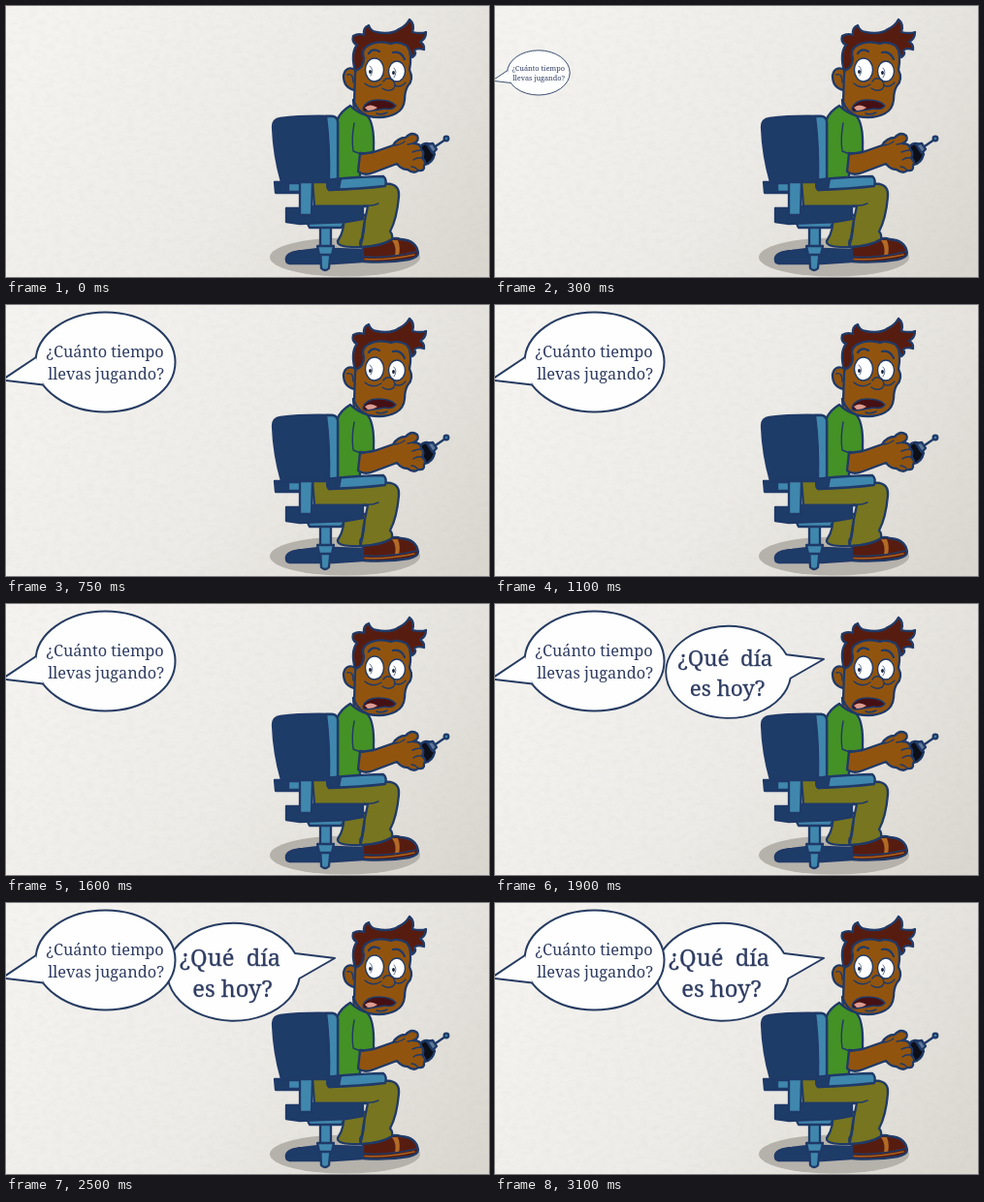
Write an HTML page that moves like this. It is 498 px wide and 280 px high and loops after 3150 ms.

```html
<!DOCTYPE html>
<html lang="es">
<head>
<meta charset="utf-8">
<title>¿Qué día es hoy?</title>
<style>
  html, body { margin: 0; width: 100%; height: 100%; overflow: hidden; background: #eceae5; }
  svg { position: absolute; left: 0; top: 0; width: 498px; height: 280px; display: block; }
  .ink { stroke: #1f3a68; stroke-width: 2.3; stroke-linejoin: round; stroke-linecap: round; }
  .line { fill: none; }
  .thin { stroke-width: 1.4; }
  .navy { fill: #1e3c68; }
  .blue { fill: #4087ad; }
  .olive { fill: #77751f; }
  .green { fill: #449126; }
  .skin { fill: #91540f; }
  .hair { fill: #571c10; }
  .bubble ellipse, .bubble path { fill: #fdfefd; stroke: #263b62; stroke-width: 2; stroke-linejoin: round; }
  .bubble text { font-family: "Noto Serif", "Liberation Serif", serif; fill: #2f3c62; text-anchor: middle; }
  .small { font-size: 16.3px; }
  .big { font-size: 23.7px; stroke: #2f3c62; stroke-width: .3; }
</style>
</head>
<body>
<svg viewBox="0 0 498 280">
  <defs>
    <linearGradient id="paper" gradientUnits="userSpaceOnUse" x1="60" y1="0" x2="470" y2="290">
      <stop offset="0" stop-color="#f4f3ef"/>
      <stop offset=".5" stop-color="#edebe7"/>
      <stop offset="1" stop-color="#dad7d0"/>
    </linearGradient>
    <filter id="grain" x="0" y="0" width="100%" height="100%">
      <feTurbulence type="fractalNoise" baseFrequency=".12 .2" numOctaves="3" seed="4"/>
      <feColorMatrix values="0 0 0 0 .45  0 0 0 0 .43  0 0 0 0 .4  .5 0 0 0 -.2"/>
    </filter>
  </defs>
  <rect width="498" height="280" fill="url(#paper)"/>
  <rect width="498" height="280" filter="url(#grain)" opacity=".3"/>
</svg>

<svg viewBox="0 0 498 280">
  <ellipse cx="349.500" cy="259.500" rx="77.500" ry="20" fill="#b5b1ab"/>

  <!-- chair base -->
  <g class="ink">
    <path class="navy" d="M289 260Q291 254 306 253L323 251H337L367 252V264L337 266H292Q288 265 289 260Z"/>
    <path class="blue" d="M324 227H335V249L333 271Q329 275 325 271L324 249Z"/>
    <path class="blue" d="M321 248H338L336 257H323Z"/>
    <path class="blue" d="M310 223H349L346 229H313Z"/>
  </g>

  <!-- shoe and legs -->
  <g class="ink">
    <path class="hair" d="M368 248Q386 249 397 241Q402 239 407 241Q423 242 425 255Q425 260 415 262Q392 266 368 264Z"/>
    <path d="M398 242Q403 249 401 258L405 258Q407 249 404 242Z" fill="#b36a25" stroke="none"/>
    <path class="line" d="M370 261.500Q394 263 421 257" style="stroke:#a8621f;stroke-width:1.600"/>
    <path class="line thin" d="M369 259Q394 261 423 254"/>
    <path class="olive" d="M348 216Q350 231 342 243Q341 250 366 249L382 216Z"/>
    <path class="olive" d="M316 181L343 180L397 184Q406 186 405 197Q403 220 396 233Q399 236 398 241Q387 248 366 249Q364 244 367 240Q369 224 373 207H318Z"/>
    <path class="line thin" d="M369 206Q378 207 384 204M370 221Q370 234 366 248"/>
  </g>

  <!-- torso -->
  <g class="ink">
    <path class="skin" d="M358 97L359 109L375 114L378 105Z"/>
    <path class="green" d="M355 103Q345 109 342 117V180H365V152Q381 154 379 147Q380 121 372 113Q362 110 355 103Z"/>
    <path class="line thin" d="M359 121Q356 137 358 150L366 153M356 104Q364 112 374 114"/>
  </g>

  <!-- seat, back and arm rest -->
  <g class="ink">
    <path class="navy" d="M289 209H303L316 207H368V220L351 223L303 225L289 223Z"/>
    <path class="navy" d="M277 182H303V193H278Z"/>
    <path class="blue" d="M291 183H304V192H291Z"/>
    <path class="navy" d="M283 116Q306 113 337 114Q342 115 342 120V182H284Q276 154 275 125Q275 117 283 116Z"/>
    <path class="blue" d="M330 114H337Q342 115 342 120V182H333Q334 144 330 114Z"/>
    <path class="blue" d="M303 182H316L315 216H303Z"/>
    <path class="blue" d="M332 180Q350 177 389 176Q393 179 391 186Q366 189 333 190Q330 187 332 180Z"/>
    <path class="navy" d="M332 180L345 178.500L343 189.500L333 190Q330 187 332 180Z"/>
  </g>

  <!-- arm and remote -->
  <g class="ink">
    <path class="line" d="M437 149L453 138"/>
    <circle class="blue" cx="454" cy="137" r="2.300"/>
    <path d="M426 146Q432 140 437 143L442 153Q440 162 432 164Z" fill="#0d0f18"/>
    <path d="M434 143L440 142L444 148L440 152Z" fill="#5f7898"/>
    <path class="skin" d="M365 153L379 151L399 144Q404 136 412 136Q418 129 424 134Q427 139 420 142Q428 142 428 148Q432 152 429 157Q434 161 431 165Q432 171 425 170Q421 174 414 169Q408 169 403 163L379 172Q369 176 363 171Z"/>
    <path class="line thin" d="M399 144Q406 144 411 140M420 142L414 143M428 149Q423 149 419 151M429 157Q424 156 420 159M425 170Q422 166 418 166"/>
  </g>

  <!-- head -->
  <g class="ink">
    <path class="skin" d="M361 66Q350 61 348 72Q348 85 360 87Z"/>
    <path class="line thin" d="M352 71Q358 69 358 79"/>
    <path class="skin" d="M365 42Q381 31 414 38Q419 52 416 66Q421 76 414 83Q411 89 411 97Q410 107 402 111Q391 117 374 114Q362 109 359 99L360 70Z"/>
    <path class="hair" d="M360 67Q355 49 362 40Q356 38 358 31Q363 28 369 30Q368 22 374 20Q376 26 382 27Q397 30 405 24Q412 21 416 14Q422 19 419 27Q428 29 433 27Q433 34 427 37Q432 40 431 45Q424 43 421 46Q424 50 419 53Q417 46 413 41Q404 36 397 39Q384 35 373 41Q366 45 369 54Q369 64 360 67Z"/>
    <path class="line" d="M374 49Q378 43 385 47M399 48Q407 46 411 55"/>
    <g class="thin">
      <ellipse cx="380" cy="66" rx="9.500" ry="12" fill="#fff"/>
      <ellipse cx="403" cy="67.500" rx="8.500" ry="10.500" fill="#fff"/>
    </g>
    <path class="line thin" d="M370 80Q378 87 387 81M401 82Q407 85 412 79"/>
    <path class="line thin" d="M389 78Q393 72 399 77Q403 82 399 86Q393 89 388 85"/>
    <path d="M368 106Q371 97 384 97Q397 97 402 103Q398 108 391 106Q380 108 372 109Q368 109 368 106Z" fill="#451014" stroke-width="1.400"/>
    <path d="M370 105Q375 100 383 105Q379 108 373 108Z" fill="#dc9c91" stroke="none"/>
    <path class="line thin" d="M382 111Q387 113 393 110"/>
    <path class="line" d="M375 62Q380 66 376 72M400 64Q404 68 400 74" stroke-width=".7"/>
  </g>
  <g fill="#14203a">
    <ellipse cx="375.500" cy="68" rx="1.400" ry="1.900"/>
    <ellipse cx="399.500" cy="69" rx="1.400" ry="1.900"/>
  </g>

  <g class="bubble" id="answer">
    <path d="M298 52L339 57L302.500 78A68.500 50.500 0 1 1 298 52Z"/>
    <text class="big" x="231" y="64.500">¿Qué&#160; día</text>
    <text class="big" x="233.500" y="97">es hoy?</text>
  </g>
  <g class="bubble" id="question">
    <ellipse cx="102.500" cy="59" rx="72" ry="51.500"/>
    <path d="M31 54L-4 77.500L38.500 82.500"/>
    <text class="small" x="102" y="54">¿Cuánto tiempo</text>
    <text class="small" x="103" y="76.500">llevas jugando?</text>
  </g>
</svg>

<script>
  const LOOP = 3150, STEP = 50, GROW = 400;
  const bubbles = [
    { id: "question", start: 228, x: -2, y: 77 },
    { id: "answer", start: 1655, x: 339, y: 57 }
  ].map(b => ({ ...b, el: document.getElementById(b.id) }));

  const easeOut = p => 1 - (1 - p) ** 3;

  // Each bubble grows out of the tip of its tail.
  function draw() {
    const t = Math.floor(performance.now() % LOOP / STEP) * STEP;
    for (const { el, start, x, y } of bubbles) {
      const s = easeOut(Math.min(1, Math.max(0, (t - start) / GROW)));
      el.style.display = s > 0 ? "" : "none";
      el.setAttribute("transform", `translate(${x} ${y}) scale(${s}) translate(${-x} ${-y})`);
    }
    requestAnimationFrame(draw);
  }
  draw();
</script>
</body>
</html>
```
